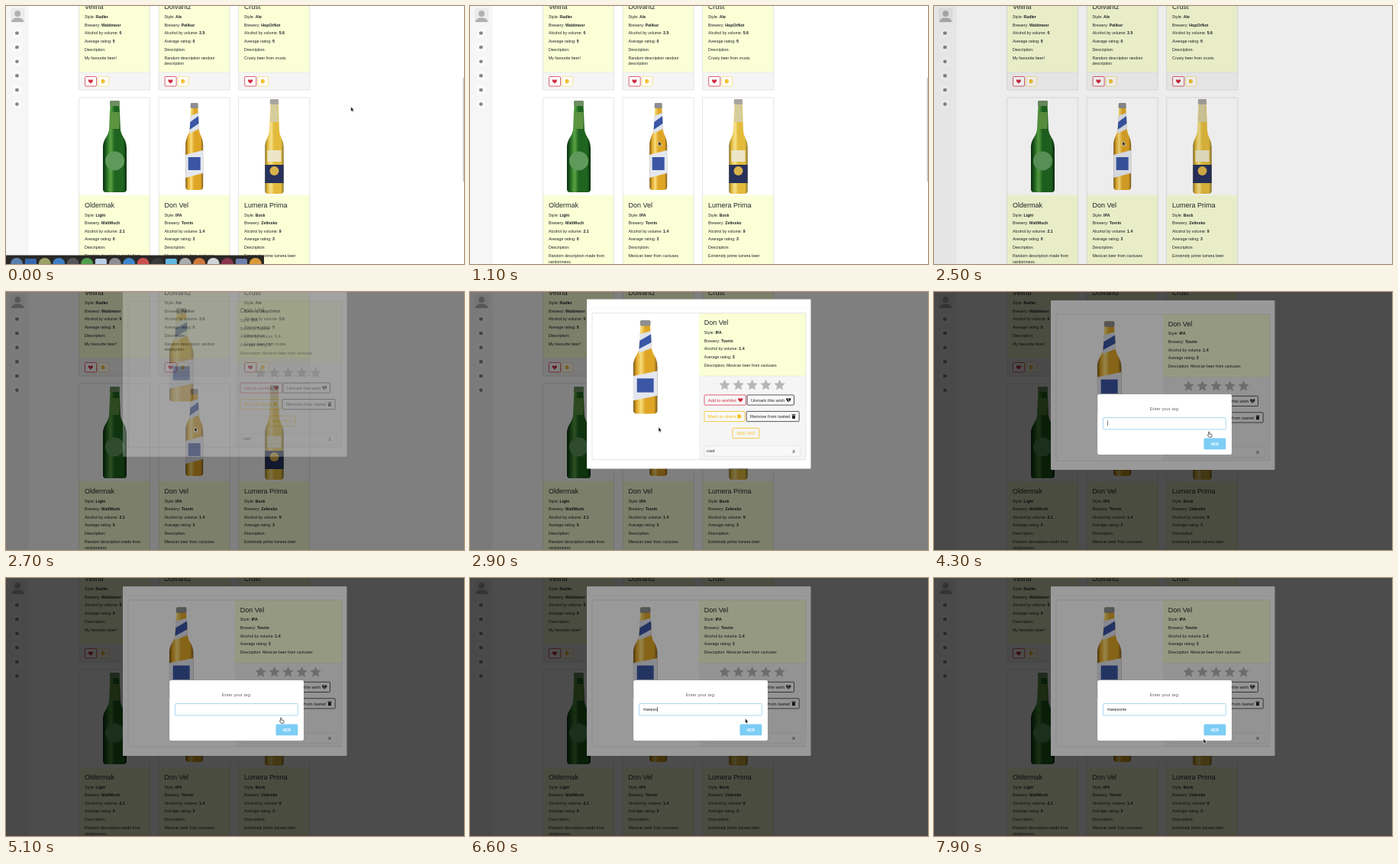
Animation of 600x338 px, one loop 8000 ms. Source, as an HTML page:

```html
<!DOCTYPE html>
<html lang="en">
<head>
<meta charset="utf-8">
<title>Beer catalogue</title>
<style>
  html, body { margin: 0; width: 100%; height: 100%; overflow: hidden; background: #fff; }
  svg { display: block; width: 100vw; height: 100vh; }
  text { font-family: "Liberation Sans", Arial, sans-serif; white-space: pre; }
</style>
</head>
<body>
<svg id="stage" viewBox="0 0 600 338"></svg>
<script>
const LOOP = 8000;
const INK = '#212529', RED = '#cf2c42', GOLD = '#f8bd10', CREAM = '#faffd6', EDGE = '#dcdcdc';

const rect = (x, y, w, h, fill, extra = '') =>
  `<rect x="${x}" y="${y}" width="${w}" height="${h}" fill="${fill}" ${extra}/>`;
const circle = (x, y, r, fill) => `<circle cx="${x}" cy="${y}" r="${r}" fill="${fill}"/>`;
const path = (d, fill, extra = '') => `<path d="${d}" fill="${fill}" ${extra}/>`;
const at = (x, y, body, sx = 1, sy = sx) =>
  `<g transform="translate(${x} ${y}) scale(${sx} ${sy})">${body}</g>`;
const text = (x, y, s, size = 5.25, fill = INK, extra = '') =>
  `<text x="${x}" y="${y}" font-size="${size}" fill="${fill}" ${extra}>${s}</text>`;
const field = (x, y, label, value) =>
  text(x, y, `${label}: <tspan font-weight="700">${value}</tspan>`);
const frame = (x, y, w, h, stroke, fill = 'none', extra = '') =>
  rect(x, y, w, h, fill, `rx="1" stroke="${stroke}" stroke-width=".75" ${extra}`);

// Icons, centred on their origin
const heart = c => path('M0 2.8C-5.4-.8-2.6-4.2 0-1.7C2.6-4.2 5.4-.8 0 2.8Z', c);
const broken = heart(INK) + path('M0-2L-.8-.3L.7.4L-.2 2', 'none', 'stroke="#f5f5f5" stroke-width=".6"');
const mug = c => rect(-2.4, -2.6, 3.8, 5.2, c, 'rx=".7"') +
  path('M1.4-1.4H2.6V1.3H1.4', 'none', `stroke="${c}" stroke-width=".7"`);
const bin = rect(-2.4, -2.8, 4.8, 1.1, INK) + rect(-2, -1.3, 4, 4.2, INK, 'rx=".5"');
const star = () => {
  const pts = [...Array(10)].map((_, i) => {
    const r = i % 2 ? 3.6 : 7.6, a = i * Math.PI / 5;
    return `${(r * Math.sin(a)).toFixed(2)},${(-r * Math.cos(a)).toFixed(2)}`;
  });
  return `<polygon points="${pts.join(' ')}" fill="#b6b6b6"/>`;
};

const gradient = (id, edge, mid, shine) => `<linearGradient id="${id}">
  <stop offset="0" stop-color="${edge}"/><stop offset=".14" stop-color="${mid}"/>
  <stop offset=".32" stop-color="${shine}"/><stop offset=".5" stop-color="${mid}"/>
  <stop offset=".86" stop-color="${mid}"/><stop offset="1" stop-color="${edge}"/></linearGradient>`;

// Bottle hanging from its origin: neck and body half-widths, height, shoulder start and end
const bottle = (neck, body, h, from, to, glass, cap, label) => {
  const mid = (from + to) / 2;
  return path(`M${-neck + 1.5} 0L${-neck} ${from}C${-neck} ${mid} ${-body} ${mid} ${-body} ${to}
    V${h - 4}Q${-body} ${h} ${4 - body} ${h}H${body - 4}Q${body} ${h} ${body} ${h - 4}
    V${to}C${body} ${mid} ${neck} ${mid} ${neck} ${from}L${neck - 1.5} 0Z`, `url(#${glass})`) +
    label + rect(-neck + .8, 0, 2 * neck - 1.6, 7, cap, 'rx="1.5"');
};
const greenBottle = bottle(7.3, 15.5, 120, 34, 62, 'green', '#6f8f62',
  rect(-6, 15, 12, 22, '#5c9440') + circle(0, 79, 12.5, '#5f9a5c'));
const amberBottle = bottle(5.8, 11.5, 114, 30, 56, 'amber', '#8f8f90',
  path('M-5.2 17L5.2 13L6 34L-6.4 40Z', '#dfe3ee') + path('M-5.4 25L5.4 17L5.8 27L-6 35Z', '#3a56a4') +
  path('M-11.5 68L11.5 62V92L-11.5 98Z', '#e4e7ef') + rect(-8, 71, 16, 17, '#3a56a4'));
const paleBottle = bottle(6.4, 12.2, 124, 38, 64, 'pale', '#a8a69e',
  path('M-4.6 7H4.6L5.4 30H-5.4Z', '#d6cc9e') + rect(-9, 67, 18, 15, '#ece5c8') +
  rect(-12.2, 86, 24.4, 24, '#27325c') + circle(0, 94, 6, '#d9b34a'));

const beers = [
  ['Velina', 'Radler', 'Waldmoor', 0, 5, ['My favourite beer!']],
  ['Dolvaritz', 'Ale', 'Pelikor', 3.5, 0, ['Random description random', 'description']],
  ['Crust', 'Ale', 'HopOrNot', 5.6, 5, ['Crusty beer from crusts']],
  ['Oldermak', 'Light', 'MaltMuch', 2.1, 0, ['Random description made from', 'randomness']],
  ['Don Vel', 'IPA', 'Tovrin', 1.4, 3, ['Mexican beer from cactuses']],
  ['Lumera Prima', 'Bock', 'Zelinsko', 9, 3, ['Extremely prime lumera beer']],
];

const details = (x, y, [name, style, brewery, abv, rating]) =>
  text(x, y, name, 9) + field(x, y + 11.6, 'Style', style) + field(x, y + 22.2, 'Brewery', brewery) +
  field(x, y + 32.8, 'Alcohol by volume', abv) + field(x, y + 43.5, 'Average rating', rating);

const card = (beer, i) => {
  const x = 95.5 + (i % 3) * 104.6, y = i < 3 ? -139.5 : 120;
  return rect(x, y, 93, 249.5, '#fff') + rect(x, y + 128, 93, 98.5, CREAM) +
    rect(x, y + 226.5, 93, 23, '#f5f5f5') + path(`M${x} ${y + 226.5}h93`, 'none', `stroke="${EDGE}" stroke-width=".5"`) +
    frame(x, y, 93, 249.5, EDGE) + details(x + 7.4, y + 143.9, beer) +
    text(x + 7.4, y + 198.3, 'Description:') +
    beer[5].map((line, k) => text(x + 7.4, y + 209 + k * 7.8, line)).join('') +
    frame(x + 8, y + 232, 15, 12.5, RED, '#fff') + at(x + 15.4, y + 238.2, heart(RED)) +
    frame(x + 25.2, y + 232, 13.6, 12.5, '#f7d774', '#fff') + at(x + 31.8, y + 238.2, mug('#f2bd2a'));
};

const sidebar = rect(0, 0, 29.5, 338, '#f6f6f6') + rect(6, 3, 18.5, 18.5, '#ebebeb', 'rx="1"') +
  circle(15.2, 10, 3.9, '#b0b0b0') + path('M7 21Q7.5 16.5 13 15.5H17.4Q23 16.5 23.5 21Z', '#b0b0b0') +
  [35.5, 54, 72.7, 91.3, 110, 128.6].map((y, i) =>
    rect(8.5, y - 5.5, 12, 11, '#fafafa', 'rx="1"') +
    (i % 3 == 2 ? circle(14.4, y, 2.3, '#858585') : rect(12.2, y - 2.1, 4.4, 4.2, '#858585', 'rx=".8"'))).join('');

const dockColours = ['#5a7fae', '#3769b0', '#9aa26a', '#3f7fc4', '#55565a', '#4fa04f', '#b9d0e6', '#8d8f94', '#3f86cf',
  '#c9504e', '#3a3a3c', '#62b8e2', '#a9adb0', '#cf7a3c', '#cfd6d8', '#8a3550', '#6f7fae', '#d89a3a'];
const dock = rect(0, 326.5, 338, 26, '#2a2826') + dockColours.map((c, i) => {
  const x = 14 + i * 18.4;
  return i % 5 == 1 || i == 11 ? rect(x - 7.5, 331, 15, 15, c, 'rx="2"') : circle(x, 338, 8, c);
}).join('');

const button = (x, y, w, label, colour, icon) => frame(x, y, w, 13.2, colour, '#f8f8f8') +
  text(x + 4.7, y + 8.8, label, 5.8, colour) + at(x + w - 7.2, y + 6.6, icon);

const modal = rect(153, 11, 293.5, 222, '#fff', 'rx="1"') +
  path('M153 23H446.5', 'none', 'stroke="#ececec" stroke-width=".5"') +
  rect(300, 29, 140, 82.5, CREAM) + rect(300, 111.5, 140, 109.5, '#f5f5f5') +
  path('M300 111.5H440', 'none', `stroke="${EDGE}" stroke-width=".5"`) + frame(160, 29, 280, 192, EDGE) +
  at(229.7, 38.3, amberBottle, 1.37, 1.075) + details(306.8, 44.8, beers[4]) +
  text(306.8, 99, 'Description: ' + beers[4][5][0]) +
  [0, 1, 2, 3, 4].map(i => at(333.6 + 18 * i, 123.5, star())).join('') +
  button(307, 136.3, 54.5, 'Add to wishlist', RED, heart(RED)) +
  button(363.2, 136.3, 61.3, 'Unmark this wish', INK, broken) +
  button(307, 157.8, 53, 'Mark as drank', GOLD, mug(GOLD)) +
  button(362.2, 157.8, 69, 'Remove from tasted', INK, bin) +
  `<g id="addTag">${frame(344, 179.8, 34.8, 13.2, GOLD)}${text(361.4, 188.4, 'ADD TAG', 5.6, GOLD, 'text-anchor="middle"')}</g>` +
  frame(307, 203, 126, 13.5, '#e2e2e2', '#f8f8f8') + text(310, 211.6, 'cool', 5.8) +
  text(424, 212, 'X', 6.2, INK, 'text-anchor="middle"');

const prompt = rect(214.2, 134, 175.8, 79, '#fff', 'rx="2"') +
  text(302, 155.3, 'Enter your tag:', 5.9, '#666', 'text-anchor="middle"') +
  frame(221.6, 164.6, 160.8, 15.4, '#8fc9ee', '#fff', 'id="input"') + text(227, 173.8, '', 5.2, '#222', 'id="typed"') +
  rect(0, 168.6, .6, 6.6, '#222', 'id="caret"') +
  rect(353.5, 191.5, 28.8, 14.8, '#7ccdf5', 'rx="1.5"') +
  text(367.9, 200.8, 'ADD', 5, '#fff', 'font-weight="700" text-anchor="middle"');

const outline = 'stroke="#fff" stroke-width=".5"';
const arrow = path('M0 0V6.2L1.4 5L2.4 7L3.4 6.5L2.5 4.6H4.3Z', '#111', outline);
const hand = path('M-.9-.6Q0-1.4.5-.4V2L3 2.6Q3.9 3 3.6 4L3 6.2H-.2L-2.2 3.6Q-2 2.6-.9 3.2Z', '#fff', 'stroke="#222" stroke-width=".7"');

const stage = document.getElementById('stage');
stage.innerHTML = `<defs>${gradient('green', '#0a2c0f', '#1f641f', '#5aa444')}
  ${gradient('amber', '#7d5a1c', '#dfa626', '#f8dd7c')}${gradient('pale', '#86702a', '#e3bb3c', '#f6e18a')}</defs>
  ${rect(0, 0, 600, 338, '#fff')}${sidebar}${beers.map(card).join('')}
  ${at(142.5, 124, greenBottle)}${at(246.7, 127, amberBottle)}${at(351.5, 122, paleBottle)}
  ${rect(598.6, 94, 1.4, 136, '#c8c8c8', 'id="scrollbar"')}<g id="dock">${dock}</g>
  ${rect(0, 0, 600, 338, '#000', 'id="backdrop"')}<g id="modal">${modal}</g>
  ${rect(0, 0, 600, 338, '#000', 'id="overlay"')}<g id="prompt">${prompt}</g>
  <g id="cursor"><g id="arrow">${arrow}</g><g id="hand">${hand}</g></g>`;

const el = Object.fromEntries([...stage.querySelectorAll('g[id], rect[id], text[id]')].map(e => [e.id, e]));
const set = (id, name, value) => el[id].setAttribute(name, value);
const show = (id, on) => set(id, 'visibility', on ? 'inherit' : 'hidden');

const span = (t, a, b) => Math.min(1, Math.max(0, (t - a) / (b - a)));
const smooth = p => p * p * (3 - 2 * p);

// Pointer moves: start time, end time, destination
const moves = [[200, 1080, 247, 177], [3380, 3900, 360.5, 184], [7150, 7850, 353, 210.5]];
const pointer = t => moves.reduce(([x, y], [a, b, tx, ty]) => {
  const p = smooth(span(t, a, b));
  return [x + (tx - x) * p, y + (ty - y) * p];
}, [451.8, 132]);

const word = '#awesome';
const keys = [5600, 5850, 6050, 6220, 6380, 6540, 6720, 6900];

function draw(t) {
  set('dock', 'transform', `translate(0 ${14 * smooth(span(t, 60, 480))})`);
  show('scrollbar', t < 2480);

  set('backdrop', 'opacity', .5 * span(t, 2480, 2630));
  const slide = 1 - span(t, 2680, 2980);
  set('modal', 'opacity', span(t, 2660, 2810));
  set('modal', 'transform', `translate(0 ${-20 * slide * slide})`);

  const hover = t >= 3800;
  const [tagBox, tagText] = el.addTag.children;
  tagBox.setAttribute('fill', hover ? GOLD : 'none');
  tagText.setAttribute('fill', hover ? INK : GOLD);

  const fade = span(t, 3980, 4280), size = .985 + .015 * fade;
  set('overlay', 'opacity', .4 * fade);
  set('prompt', 'opacity', fade);
  set('prompt', 'transform', `translate(302 173.5) scale(${size}) translate(-302 -173.5)`);
  set('input', 'stroke-opacity', span(t, 4100, 4300));

  const count = keys.filter(k => t >= k).length;
  const typed = word.slice(0, count);
  if (el.typed.textContent !== typed) el.typed.textContent = typed;
  const since = t - (count ? keys[count - 1] : 4050);
  show('caret', since >= 0 && since % 1200 < 600);
  set('caret', 'x', 227.2 + (count ? el.typed.getComputedTextLength() : 0));

  const [x, y] = pointer(t);
  set('cursor', 'transform', `translate(${x} ${y})`);
  const pointing = hover && t < 5850;
  show('hand', pointing);
  show('arrow', !pointing);
}

const tick = now => {
  draw(now % LOOP);
  requestAnimationFrame(tick);
};
draw(0);
requestAnimationFrame(tick);
</script>
</body>
</html>
```
